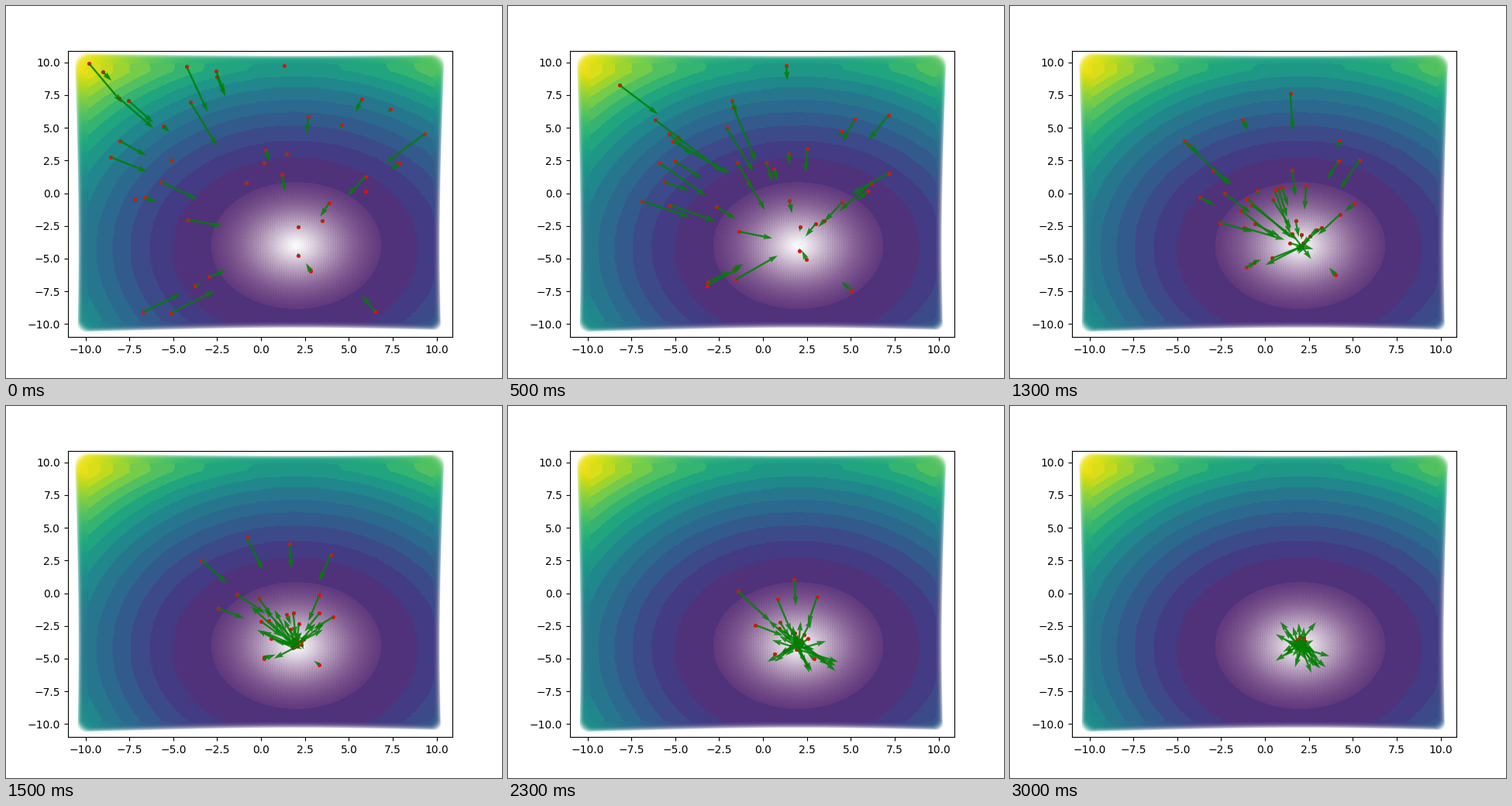
A matplotlib script for the animation above (3500 ms loop, 640 by 480 pixels).

```python
import numpy as np
import matplotlib.pyplot as plt
from matplotlib.animation import FuncAnimation

W, H = 640, 480
STEPS = 7
BEST = np.array([2, -4])
BEST_PX = np.array([375.5, 309.5])

# Starting places in stage pixels, from the slowest particle to the quickest.
STARTS = np.array([
    (359, 77), (362, 191), (310, 228), (464, 239), (408, 277), (377, 285),
    (333, 202), (213, 199), (167, 250), (496, 133), (433, 153), (125, 85),
    (203, 155), (244, 361), (507, 203), (459, 120), (179, 247), (271, 84),
    (272, 91), (335, 186), (147, 174), (158, 122), (390, 143), (262, 349),
    (135, 195), (146, 119), (107, 74), (476, 394), (233, 78), (356, 218),
    (464, 220), (201, 227), (177, 395), (238, 124), (540, 165), (235, 276),
    (393, 342), (417, 254), (213, 396), (377, 322),
])


def swarm():
    """Simulate the flight to the optimum; one (position, velocity) per step."""
    rng = np.random.default_rng(4)
    n = len(STARTS)
    away = STARTS - BEST_PX
    share = np.ones(n)                               # distance still to go
    speed = np.clip(np.linspace(-0.06, 0.32, n), 0, None)
    arrived = np.zeros(n, dtype=bool)
    states = []
    for _ in range(STEPS):
        pos = BEST_PX + away * share[:, None]
        pos += rng.normal(0, 3, (n, 2)) * arrived[:, None]
        vel = -away * speed[:, None] * rng.uniform(0.8, 1.2, (n, 2))
        states.append((pos, vel))

        share = share - 1.6 * speed
        arrived |= share < 0.03
        share[arrived] = 0.02
        pulled = 0.6 * speed + 0.3 * rng.random(n) * share
        # Particles at the optimum swing back and forth across it.
        speed = np.where(arrived, -0.9 * speed, pulled)
    return states


def cost(x, y):
    return (x - BEST[0]) ** 2 + (y - BEST[1]) ** 2


def landscape(fig, ax):
    """Render the cost dots once and flatten their colours into bands."""
    side = np.arange(-10, 10, 0.1)
    gx, gy = np.meshgrid(side, side)
    z = cost(gx, gy).ravel()
    dots = ax.scatter(gx.ravel(), gy.ravel(), s=z, c=z, alpha=0.1)
    ax.axis("off")
    fig.canvas.draw()
    img = np.asarray(fig.canvas.buffer_rgba())[..., :3].copy()
    dots.remove()
    ax.axis("on")

    h, w = img.shape[:2]
    col, row = np.meshgrid(np.arange(w) + 0.5, np.arange(h) + 0.5)
    to_data = ax.transData.inverted().transform
    x, y = to_data(np.column_stack([col.ravel(), h - row.ravel()])).T.reshape(2, h, w)
    level = cost(x, y)

    # Each pixel takes the nearest of the mean colours of the cost bands.
    edges = np.r_[23.5, 50, np.linspace(67, 310, 13), 400]
    flat = (np.abs(x) < 9.85) & (y > -9.8) & (y < 9.9) & (level > edges[0])
    pixels = img[flat].astype(float)
    band = np.digitize(level[flat], edges)
    shades = np.array([pixels[band == b].mean(axis=0) for b in np.unique(band)])
    gap = np.array([((pixels - s) ** 2).sum(axis=1) for s in shades])
    img[flat] = shades[gap.argmin(axis=0)].round().astype(np.uint8)
    return img


def layer(fig, zorder):
    """A full-stage axes measured in pixels, y pointing down."""
    ax = fig.add_axes([0, 0, 1, 1], zorder=zorder)
    ax.set(xlim=(0, W), ylim=(H, 0))
    ax.axis("off")
    return ax


fig = plt.figure(figsize=(W / 100, H / 100), dpi=100)
ax = fig.add_subplot(zorder=1)
margin = 0.05 * 19.9
ax.set(xlim=(-10 - margin, 9.9 + margin), ylim=(-10 - margin, 9.9 + margin))
ticks = np.arange(-10, 10.1, 2.5)
ax.set_xticks(ticks)
ax.set_yticks(ticks)

surface = landscape(fig, ax)
ax.patch.set_visible(False)
back = layer(fig, 0)
back.imshow(surface, extent=(0, W, H, 0), aspect="auto", interpolation="nearest")
front = layer(fig, 2)
states = swarm()
shown = []


def draw(k):
    while shown:
        shown.pop().remove()
    pos, vel = states[k]
    shown.append(front.scatter(*pos.T, s=9, color="#e8100c", linewidths=0.7, zorder=1))
    shown.append(front.quiver(*pos.T, *vel.T, color="green", alpha=0.85,
                              angles="xy", scale_units="xy", scale=1,
                              units="width", width=2.4 / W, zorder=2))
    return shown


anim = FuncAnimation(fig, draw, frames=STEPS, init_func=lambda: draw(0),
                     interval=500, repeat=True, repeat_delay=0, blit=False)
plt.show()
```
